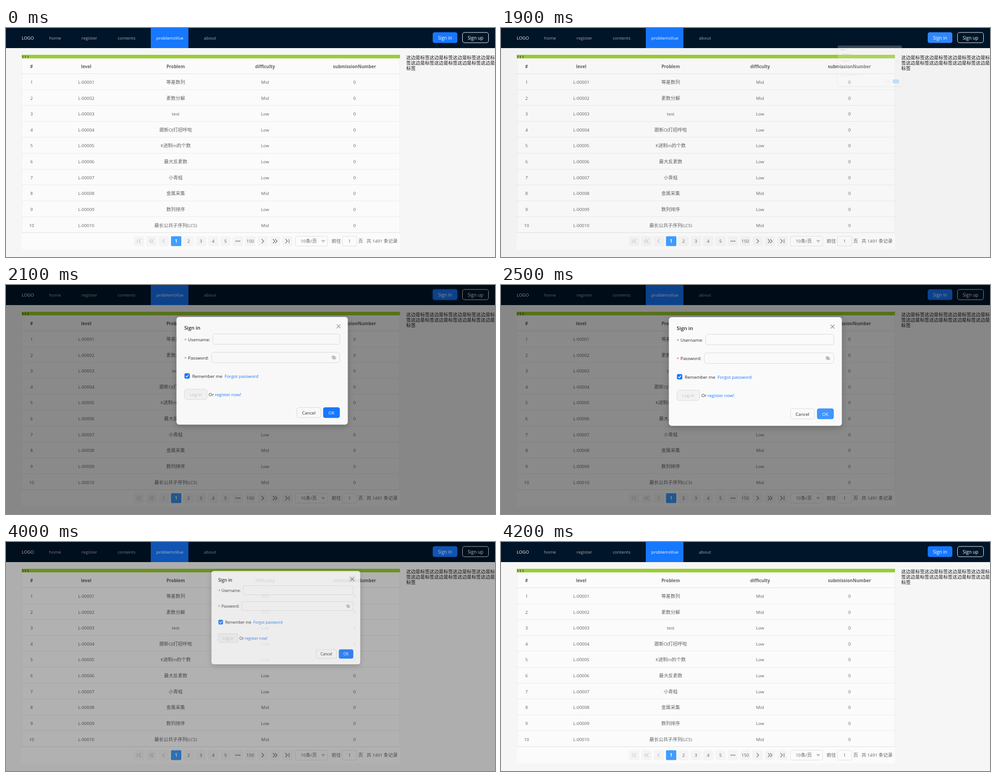
Animation, 1091 px wide and 513 px high, one loop 5.2 s. Source, as an HTML page:

```html
<!DOCTYPE html>
<html lang="en">
<head>
<meta charset="utf-8">
<title>Problem list</title>
<style>
  html, body { margin: 0; width: 100%; height: 100%; overflow: hidden; background: #f6f6f6; }
  svg { display: block; width: 1091px; height: 513px; }
  text { font-family: "Open Sans", "Noto Sans CJK SC", "Noto Sans CJK", sans-serif; white-space: pre; }
  #modal { transform-origin: 973.5px 20px; }
  #panel { filter: drop-shadow(0 4px 7px rgba(0, 0, 0, .22)); }
</style>
</head>
<body>
<svg viewBox="0 0 1091 513">
  <g id="page"></g>
  <rect id="mask" width="1091" height="513" opacity="0"/>
  <g id="modal"></g>
</svg>
<script>
const LOOP = 5200, SIZE = 9.8, CJK = 1.063;
const BLUE = '#1677ff', HOVER = '#4096ff', INK = '#606266', DARK = '#262626', PALE = '#c0c4cc';
const $ = id => document.getElementById(id);
let layer;

function add(tag, attrs, parent = layer) {
  const el = document.createElementNS('http://www.w3.org/2000/svg', tag);
  for (const k in attrs) el.setAttribute(k, attrs[k]);
  parent.append(el);
  return el;
}
const box = (x, y, w, h, fill, more) => add('rect', { x, y, width: w, height: h, fill, ...more });
const line = (d, stroke, more) => add('path', { d, stroke, fill: 'none', ...more });

// Chinese runs are set slightly larger than Latin ones.
function text(str, x, y, fill = INK, more = {}) {
  const size = more['font-size'] || SIZE;
  const el = add('text', { x, y, fill, 'font-size': size, ...more });
  for (const run of str.match(/[\u4e00-\u9fff]+|[^\u4e00-\u9fff]+/g)) {
    const span = add('tspan', /[\u4e00-\u9fff]/.test(run) ? { 'font-size': size * CJK } : {}, el);
    span.textContent = run;
  }
  return el;
}
const mid = (str, x, y, fill, more) => text(str, x, y, fill, { 'text-anchor': 'middle', ...more });

// Header
layer = $('page');
box(0, 0, 1091, 45, '#001529');
box(323, 0, 84, 45, BLUE);
text('LOGO', 35, 25.5, '#fff');
[['home', 109.5], ['register', 186], ['contents', 269], ['problemsVue', 365.5], ['about', 455]].forEach(
  ([s, x], i) => mid(s, x, 25.5, i === 3 ? '#fff' : 'rgba(255,255,255,.65)'));
const wave = box(952, 9.5, 55, 24, 'none', { rx: 4.5, stroke: BLUE });
const signIn = box(952, 9.5, 55, 24, BLUE, { rx: 4.5 });
mid('Sign in', 979.5, 25.5, '#fff', { 'font-size': 10.2 });
const signUp = box(1018.5, 10, 58, 23, 'none', { rx: 4.5, stroke: '#fff' });
const signUpText = mid('Sign up', 1047.5, 25.5, '#fff', { 'font-size': 10.2 });

// Table
box(35, 60, 844, 8, '#9acd32');
text('111', 35, 69, '#222');
box(35, 68, 844, 428, '#fbfbfb');
const cols = [57, 179, 378.5, 578, 777.5];
['#', 'level', 'Problem', 'difficulty', 'submissionNumber'].forEach(
  (s, i) => mid(s, cols[i], 89.5, INK, { 'font-weight': 700 }));
line('M35.5 68V459M878.5 68V459', '#ebeef2');
line('M35 102.5H879', '#dfe1e6');
const names = ['等差数列', '素数分解', 'test', '跟新OJ打招呼啦', 'K进制m的个数', '最大反素数', '小青蛙', '金属采集', '数列排序', '最长公共子序列(LCS)'];
names.forEach((name, i) => {
  const n = i + 1, y = 125 + 35.62 * i;
  const level = [1, 2, 8, 10].includes(n) ? 'Mid' : 'Low';
  [n + '', 'L-' + String(n).padStart(5, '0'), name, level, '0'].forEach((s, c) => mid(s, cols[c], y));
  line(`M35 ${Math.floor(138 + 35.62 * i) + .5}H879`, n < 10 ? '#e8eaec' : '#dcdee2');
});

// Pagination
const icons = {
  0: 'M293 473V482M301 473L296.5 477.5L301 482',
  1: 'M324.5 473L320 477.5L324.5 482M329.5 473L325 477.5L329.5 482',
  2: 'M354 473L349.5 477.5L354 482',
  10: 'M570.5 473L575 477.5L570.5 482',
  11: 'M595.5 473L600 477.5L595.5 482M600.5 473L605 477.5L600.5 482',
  12: 'M623.5 473L628 477.5L623.5 482M631.5 473V482'
};
['', '', '', '1', '2', '3', '4', '5', '', '150', '', '', ''].forEach((s, i) => {
  const x = 297 + 27.55 * i, on = i === 3;
  box(x - 11.5, 466.5, 23, 22, on ? '#409eff' : '#f4f4f5', { rx: 2 });
  if (s) mid(s, x, 481.3, on ? '#fff' : INK, on ? { 'font-weight': 700 } : {});
  else if (i === 8) [-4, 0, 4].forEach(d => add('circle', { cx: x + d, cy: 477.5, r: 1.2, fill: INK }));
  else line(icons[i], i < 3 ? PALE : INK, { 'stroke-width': 1.1 });
});
const frame = { rx: 3, stroke: '#dcdfe6' };
box(645.5, 466.5, 72, 22, '#fbfbfb', frame);
mid('10条/页', 675.5, 481.3);
add('path', { d: 'M703 475H712.5L707.75 481Z', fill: PALE });
text('前往', 726.5, 481.3);
box(750.5, 466.5, 32, 22, '#fbfbfb', frame);
mid('1', 766.5, 481.3);
text('页', 786, 481.3);
text('共 1491 条记录', 804.5, 481.3);

// Side note
const note = '这边是标签'.repeat(8);
[note.slice(0, 19), note.slice(19, 38), note.slice(38)].forEach((s, i) => text(s, 893, 70 + 12 * i, '#111'));

// Dialog
layer = $('modal');
const edge = { rx: 4.5, stroke: '#d9d9d9' };
box(374.5, 72, 386, 243.5, '#fafafa', { rx: 6, id: 'panel' });
text('Sign in', 392, 100.5, DARK, { 'font-size': 11.4, 'font-weight': 600 });
const closeBg = box(731, 84.5, 17, 17, '#000', { rx: 3 });
const cross = line('M735.5 89L744 97.5M744 89L735.5 97.5', '#888', { 'stroke-width': 1.1 });
[['Username', 127, 456.5, 110.5], ['Password', 168, 453.5, 152]].forEach(([s, y, x, top]) => {
  text('*', 392, y + 1, '#ff4d4f');
  text(s + ':', 400.5, y, DARK);
  box(x, top, 742.5 - x, 23.5, '#fafafa', edge);
});
line('M724 164Q729 157 734 164Q729 171 724 164ZM725 159.5L733.5 168', '#888');
add('circle', { cx: 729, cy: 164, r: 1.6, fill: 'none', stroke: '#888' });
box(392.5, 199.5, 12, 12, BLUE, { rx: 3 });
line('M395.3 205.5L397.7 208L401.8 203', '#fff', { 'stroke-width': 1.5 });
text('Remember me', 410, 209.5, DARK);
text('Forgot password', 483, 209.5, BLUE);
box(392.5, 235.5, 51, 23, '#f2f2f2', edge);
mid('Log in', 418, 251, '#c0c0c0');
text('Or', 447, 251, DARK);
text('register now!', 461, 251, BLUE);
box(646, 277, 53.5, 23, '#fafafa', edge);
mid('Cancel', 672.5, 292.5, DARK);
const ok = box(705, 276.5, 37.5, 24, BLUE, { rx: 4.5 });
mid('OK', 723.7, 292.5, '#fff');

const clamp = v => Math.min(1, Math.max(0, v));

function ease(x1, y1, x2, y2, x) {
  const at = (a, b, u) => 3 * u * (1 - u) ** 2 * a + 3 * u * u * (1 - u) * b + u ** 3;
  let lo = 0, hi = 1;
  for (let i = 0; i < 24; i++) {
    const u = (lo + hi) / 2;
    if (at(x1, x2, u) < x) lo = u; else hi = u;
  }
  return at(y1, y2, hi);
}

function draw(now) {
  const t = Math.floor(now % LOOP / 100) * 100; // the screen refreshes ten times a second
  const within = (a, b) => t >= a && t < b;

  const tint = within(200, 300) ? '#8fc1ff' : '#fff';
  signUp.setAttribute('stroke', tint);
  signUpText.setAttribute('fill', tint);
  signIn.setAttribute('fill', within(700, 1900) ? HOVER : t === 600 || t === 1900 ? '#2f88ff' : BLUE);
  wave.setAttribute('stroke-width', t === 2000 ? 5 : 8);
  wave.setAttribute('opacity', t === 2000 ? .35 : t === 2100 ? .12 : 0);
  ok.setAttribute('fill', within(2500, 3200) ? HOVER : BLUE);
  cross.setAttribute('stroke', t >= 3500 ? '#1a1a1a' : '#888');
  closeBg.setAttribute('opacity', t >= 3500 ? .05 : 0);

  const closing = t >= 3930;
  const start = closing ? 3930 : 1893;
  const fade = clamp((t - start) / 200);
  const zoom = closing
    ? 1 - ease(.78, .14, .15, .86, fade)
    : ease(.08, .82, .17, 1, clamp((t - start) / 300));
  const shown = t > 1893 && t < 4130;
  $('mask').setAttribute('opacity', .45 * (closing ? 1 - fade : fade));
  const style = $('modal').style;
  style.display = shown ? '' : 'none';
  style.opacity = zoom;
  style.transform = `scale(${.2 + .8 * zoom})`;
}

let begin;
function tick(now) {
  begin ??= now;
  draw(now - begin);
  requestAnimationFrame(tick);
}
draw(0);
requestAnimationFrame(tick);
</script>
</body>
</html>
```
